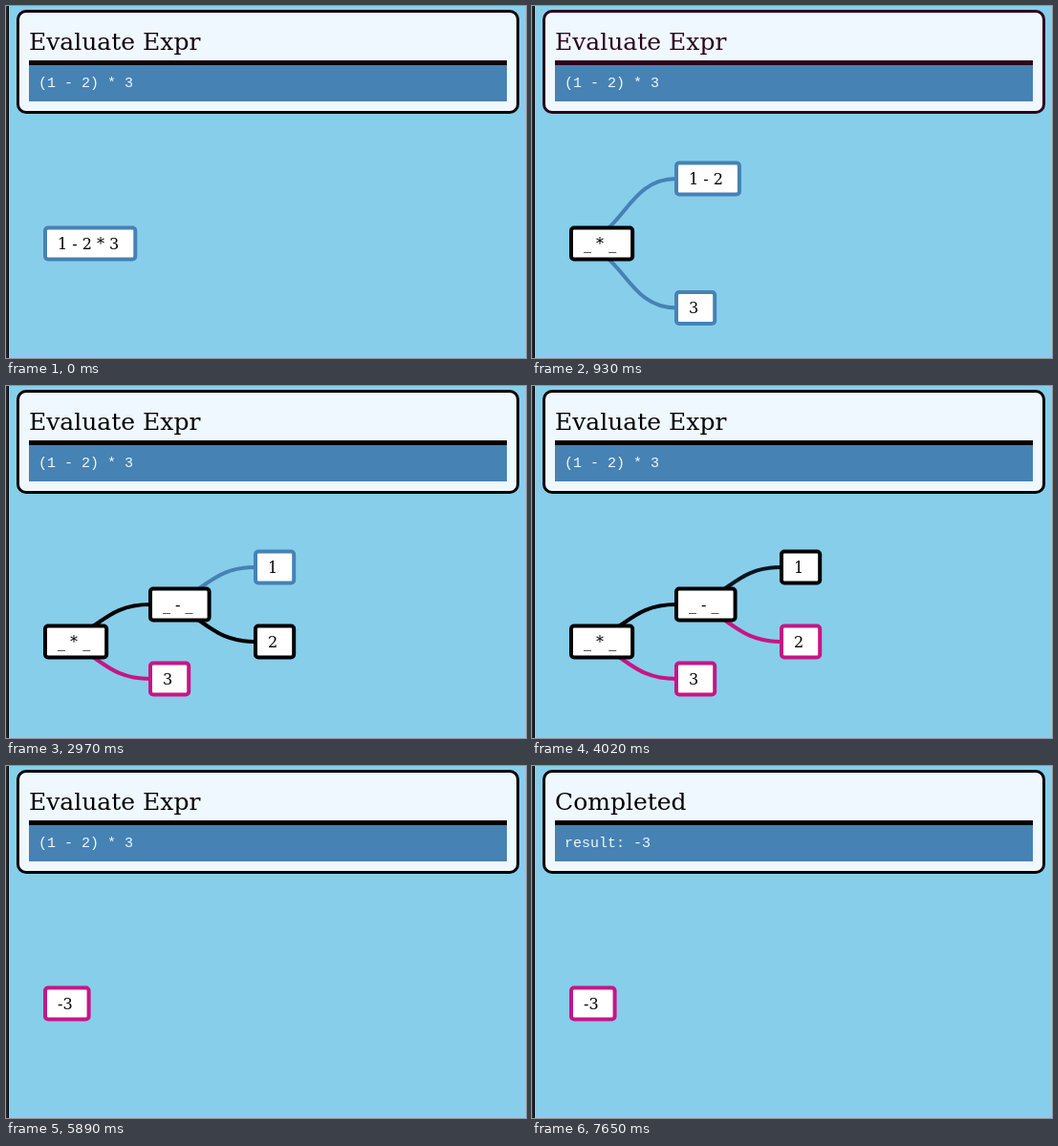
An HTML page that plays this animation: 544 px wide and 369 px high, repeating every 7810 ms.

```html
<!DOCTYPE html>
<html lang="en">
<head>
<meta charset="utf-8">
<title>Evaluate Expr</title>
<style>
  html, body { margin: 0; width: 100%; height: 100%; overflow: hidden; background: skyblue; }
  svg { display: block; }
  text { font: 16px "DejaVu Serif", serif; white-space: pre; }
  .title { font-size: 25px; }
  .code { font: 15px "Liberation Mono", monospace; fill: aliceblue; }
</style>
</head>
<body>
<svg id="stage" width="544" height="369" viewBox="0 0 544 369"></svg>
<script>
const LOOP = 7810, MOVE = 250;
const TODO = [70, 130, 180], BUSY = [0, 0, 0], DONE = [199, 21, 133];
const stage = document.getElementById('stage');
const pen = document.createElement('canvas').getContext('2d');
pen.font = '16px "DejaVu Serif", serif';

// Tree, deepest nodes first so that parents are painted on top
const tree = {
  one: { parent: 'minus', depth: 2 },
  two: { parent: 'minus', depth: 2 },
  minus: { parent: 'root', depth: 1 },
  three: { parent: 'root', depth: 1 },
  root: { depth: 0 }
};

// Vertical centres for each shape of the tree
const single = { root: 249 };
const pair = { root: 249, minus: 181, three: 316.5 };
const full = { root: 268, minus: 229, three: 307, one: 190, two: 268 };

// Each step lists only the nodes that change: [label, colour]
const steps = [];
function step(at, layout, changes) {
  const last = steps.length ? steps[steps.length - 1].nodes : {};
  const nodes = {};
  for (const id in layout) {
    const [label, color] = changes[id] || [last[id].label, last[id].color];
    nodes[id] = { label, color, x: 41 + 110 * tree[id].depth, y: layout[id] };
  }
  steps.push({ at, nodes });
}
step(-MOVE, single, { root: ['1 - 2 * 3', TODO] });
step(445, pair, { root: ['_ * _', BUSY], minus: ['1 - 2', TODO], three: ['3', TODO] });
step(1005, pair, { three: ['3', BUSY] });
step(1570, pair, { three: ['3', DONE] });
step(2160, full, { minus: ['_ - _', BUSY], one: ['1', TODO], two: ['2', TODO] });
step(2720, full, { two: ['2', BUSY] });
step(3300, full, { two: ['2', DONE] });
step(3885, full, { one: ['1', BUSY] });
step(4465, full, { one: ['1', DONE] });
step(5071, pair, { minus: ['-1', DONE] });
step(5640, single, { root: ['-3', DONE] });

const mix = (a, b, p) => a + (b - a) * p;
const rgb = (a, b, p) => `rgb(${a.map((v, i) => Math.round(mix(v, b[i], p)))})`;

// cubic-bezier(.25, .1, .25, 1)
function ease(x) {
  if (x <= 0) return 0;
  if (x >= 1) return 1;
  let lo = 0, hi = 1, s;
  for (let i = 0; i < 20; i++) {
    s = (lo + hi) / 2;
    if (.75 * s * (1 - s) + s ** 3 < x) lo = s; else hi = s;
  }
  return .3 * s * (1 - s) ** 2 + 3 * s * s * (1 - s) + s ** 3;
}

const flash = (t, start, peak, end) =>
  t < peak ? ease((t - start) / (peak - start)) : 1 - ease((t - peak) / (end - peak));

function header(t) {
  const done = t >= 6180;
  const glow = done ? flash(t, 6180, 6770, 7660) : flash(t, -50, 550, 1330);
  const color = rgb(BUSY, DONE, glow);
  return `
    <rect width="3" height="369" fill="#000"/>
    <rect width="2" height="369" fill="#26292c"/>
    <rect x="12.5" y="5.5" width="523" height="106" rx="8.5" fill="aliceblue" stroke="${color}" stroke-width="3"/>
    <text class="title" x="24" y="46" fill="${color}">${done ? 'Completed' : 'Evaluate Expr'}</text>
    <rect x="24" y="57" width="500" height="5" fill="${color}"/>
    <rect x="24" y="62" width="500" height="38" fill="steelblue"/>
    <text class="code" x="34" y="85">${done ? 'result: -3' : '(1 - 2) * 3'}</text>`;
}

function graph(t) {
  const k = steps.findLastIndex(s => s.at <= t);
  const now = steps[k].nodes, old = k ? steps[k - 1].nodes : now;
  const p = ease((t - steps[k].at) / MOVE);
  const pos = {};
  let links = '', boxes = '';
  for (const id in tree) {
    if (!now[id] && (p === 1 || !old[id])) continue;
    const { parent } = tree[id];
    const from = old[id] || old[parent], to = now[id] || now[parent];
    pos[id] = { x: mix(from.x, to.x, p), y: mix(from.y, to.y, p) };
  }
  for (const id in pos) {
    const { x, y } = pos[id], node = now[id] || old[id];
    const base = pos[tree[id].parent];
    if (base) {
      const mid = (base.x + x) / 2;
      const color = rgb((old[id] || node).color, node.color, p);
      links += `<path d="M${base.x} ${base.y}C${mid} ${base.y} ${mid} ${y} ${x} ${y}" fill="none" stroke="${color}" stroke-width="4"/>`;
    }
    const width = pen.measureText(node.label).width + 30;
    boxes += `<rect x="${x}" y="${y - 16.5}" width="${width}" height="33" rx="3" fill="#fff" stroke="rgb(${node.color})" stroke-width="4"/>
      <text x="${x + 13}" y="${y + 5.5}">${node.label}</text>`;
  }
  return links + boxes;
}

function draw() {
  const t = performance.now() % LOOP;
  stage.innerHTML = header(t) + graph(t);
  requestAnimationFrame(draw);
}
draw();
</script>
</body>
</html>
```
